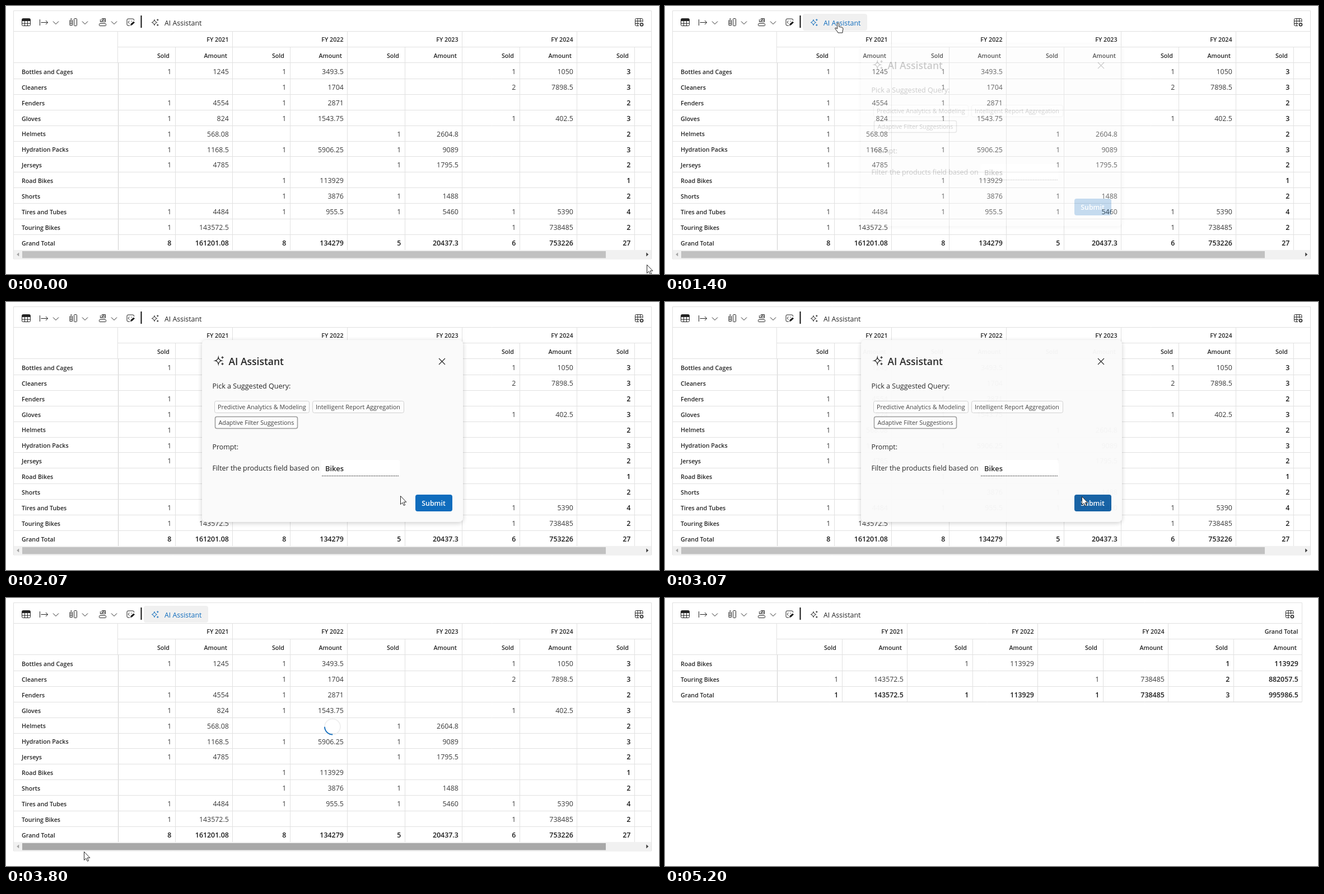
Animation, 1166 px wide and 480 px high, one loop 6.8 s. Source, as an HTML page with a canvas:

```html
<!DOCTYPE html>
<html lang="en">
<head>
<meta charset="utf-8">
<title>Pivot table assistant</title>
<style>
html, body { margin: 0; width: 100%; height: 100%; overflow: hidden; background: #fff; }
canvas { display: block; }
</style>
</head>
<body>
<canvas id="stage" width="1166" height="480"></canvas>
<script>
const stage = document.getElementById('stage').getContext('2d');
const layer = new OffscreenCanvas(1166, 480).getContext('2d');
let ctx = stage;
const LOOP = 6800, FPS = 15;
const INK = '#242424', BLUE = '#0f6cbd', LINE = '#e1e1e1';

const FULL = {
  right: 1152.5, bottom: 453, colWidth: 102.5,
  groups: ['FY 2021', 'FY 2022', 'FY 2023', 'FY 2024', ''],
  rows: [
    'Bottles and Cages|1|1245|1|3493.5|||1|1050|3',
    'Cleaners|||1|1704|||2|7898.5|3',
    'Fenders|1|4554|1|2871|||||2',
    'Gloves|1|824|1|1543.75|||1|402.5|3',
    'Helmets|1|568.08|||1|2604.8|||2',
    'Hydration Packs|1|1168.5|1|5906.25|1|9089|||3',
    'Jerseys|1|4785|||1|1795.5|||2',
    'Road Bikes|||1|113929|||||1',
    'Shorts|||1|3876|1|1488|||2',
    'Tires and Tubes|1|4484|1|955.5|1|5460|1|5390|4',
    'Touring Bikes|1|143572.5|||||1|738485|2',
    'Grand Total|8|161201.08|8|134279|5|20437.3|6|753226|27'
  ]
};
const FILTERED = {
  right: 1137.5, bottom: 186, colWidth: 116.5,
  groups: ['FY 2021', 'FY 2022', 'FY 2024', 'Grand Total'],
  rows: [
    'Road Bikes|||1|113929|||1|113929',
    'Touring Bikes|1|143572.5|||1|738485|2|882057.5',
    'Grand Total|1|143572.5|1|113929|1|738485|3|995986.5'
  ]
};

// Pointer stops: step, x, y
const POINTER = [
  [0, 1144, 463], [1, 820, 288], [2, 504, 119], [4, 504, 119], [8, 390, 62], [13, 309, 30],
  [28, 309, 30], [31, 704, 347], [34, 704, 347], [39, 744, 348], [46, 744, 348],
  [56, 187, 430], [57, 139, 454], [59, 43, 502]
];

const clamp = v => Math.max(0, Math.min(1, v));

function text(s, x, y, size, { weight = 400, color = INK, align = 'left' } = {}) {
  ctx.font = `${weight} ${size}px "Open Sans", "Noto Sans", sans-serif`;
  ctx.fillStyle = color;
  ctx.textAlign = align;
  ctx.fillText(s, x, y);
}
function box(x, y, w, h, r, fill, stroke, width = 1) {
  ctx.beginPath();
  ctx.roundRect(x, y, w, h, r);
  if (fill) { ctx.fillStyle = fill; ctx.fill(); }
  if (stroke) { ctx.strokeStyle = stroke; ctx.lineWidth = width; ctx.stroke(); }
}
function path(d, color = INK, width = 1, fill) {
  const p = new Path2D(d);
  if (fill) { ctx.fillStyle = fill; ctx.fill(p); }
  ctx.strokeStyle = color;
  ctx.lineWidth = width;
  ctx.stroke(p);
}
function at(x, y, draw, scale = 1) {
  ctx.save();
  ctx.translate(x, y);
  ctx.scale(scale, scale);
  draw();
  ctx.restore();
}
const hline = (x1, x2, y, color = LINE) => path(`M${x1} ${y}H${x2}`, color);
const vline = (x, y1, y2, color = LINE) => path(`M${x} ${y1}V${y2}`, color);

function sparkles(color) {
  path('M5 1.5Q5.8 5.8 9.6 6.5Q5.8 7.2 5 11.5Q4.2 7.2 .4 6.5Q4.2 5.8 5 1.5Z', color);
  path('M10.8 .2v3.4M9.1 1.9h3.4M10.8 9.4v3.4M9.1 11.1h3.4', color);
}

function toolbar(right, active, pressed) {
  path('M28.5 24.5q0-2 2-2h11q2 0 2 2v9q0 2-2 2h-11q-2 0-2-2zM28.5 31.2h15M33.5 26v9.5M38.5 26v9.5');
  box(28.5, 22.5, 15, 4.5, [2, 2, 0, 0], INK);
  path('M60.5 24v11M62.5 29.5h12M71 26l3.7 3.5-3.7 3.5');
  path('M121.5 23.5q0-1 1-1h3q1 0 1 1v11q0 1-1 1h-3q-1 0-1-1zM118.5 25.5h-4.5v9h4.5zM114 28.5h4.5M114 31.5h4.5M115 23h3');
  path('M167.5 31.5h10q1 0 1 1v2q0 1-1 1h-10q-1 0-1-1v-2q0-1 1-1zM171.5 22.5h6v6h-6zM171.5 25.5h6M168.5 24v4.5h3M174.5 22.5v3');
  path('M228.5 26v-1q0-2-2-2h-8.5q-2 0-2 2v8q0 2 2 2h3M220.5 26.5l-2.5 2.5 2.5 2.5M223.5 26.5l1.5 1.5');
  path('M222.5 34.5l1-3 4.5-3.5 1.5 1.5-4 4z', INK, 1, INK);
  for (const x of [84, 136, 188]) path(`M${x} 27.5l5 5 5-5`);
  path('M241.5 17v22', '#111', 2);

  if (active) box(246, 14, 115, 30, 4, pressed ? '#ebebeb' : '#f0f0f0');
  const color = active ? BLUE : INK;
  at(260, 23, () => sparkles(color));
  text('AI Assistant', 283, 34.5, 12.4, { color });

  at(right - 29.5, 22, () => {
    path('M14 6.5V2.5q0-2-2-2H2.5q-2 0-2 2v9q0 2 2 2H7M.5 5H14M.5 9.5H8M5 .5v13M9.5 .5V7');
    box(9.5, 8.7, 5, 5, 2.5, null, INK, 1.6);
  });
}

function table({ right, bottom, colWidth, groups, rows }) {
  const left = 13.5, first = 199.5, top = 102, pitch = 27.9;
  const columns = groups.length * 2;
  // The last column takes up whatever width is left over.
  const edge = i => i < columns ? first + i * colWidth : Math.max(right, first + i * colWidth);

  ctx.save();
  ctx.beginPath();
  ctx.rect(0, 0, right, 480);
  ctx.clip();
  hline(left, right, 45.5);
  hline(first, right, 73.5);
  hline(left, right, 101.5);
  vline(first, 45, top);
  vline(200.5, top, bottom, '#cfcfcf');

  const bold = { weight: 600, align: 'right' };
  groups.forEach((name, g) => {
    const mid = edge(g * 2 + 1), end = edge(g * 2 + 2);
    text(name, end - 7, 64, 10.7, bold);
    text('Sold', mid - 10, 92.5, 10.7, bold);
    text('Amount', end - 9.5, 92.5, 10.7, bold);
    vline(Math.floor(mid) + .5, 73, bottom);
    vline(Math.floor(end) + .5, 45, bottom);
  });

  rows.forEach((row, r) => {
    const [label, ...cells] = row.split('|');
    const base = 122 + r * pitch;
    hline(left, right, Math.round(top + (r + 1) * pitch) + .5);
    text(label, 28, base - .2, 10.7, { weight: 600 });
    cells.forEach((value, c) => {
      const total = r === rows.length - 1 || c >= columns - 2;
      text(value, edge(c + 1) - 6.7, base, 12.4,
        { weight: total ? 600 : 400, color: total ? '#1a1a1a' : '#3a3a3a', align: 'right' });
    });
  });
  ctx.restore();
  box(left, 8.5, right - left, bottom - 8.5, 0, null, LINE);
}

function scrollbar(hot) {
  box(14, 437, 1138, 16, 0, '#f1f1f1');
  box(29, 439, 1042, 12.5, 0, hot ? '#a8a8a8' : '#c1c1c1');
  path('M23 442v6l-3.5-3z', '#a3a3a3', .5, '#a3a3a3');
  path('M1143.5 442v6l3.5-3z', '#404040', .5, '#404040');
}

// Cubic easing with control points (.53,.21) and (.29,.67)
function swing(p) {
  const curve = (s, a, b) => 3 * (1 - s) ** 2 * s * a + 3 * (1 - s) * s * s * b + s ** 3;
  let lo = 0, hi = 1;
  for (let i = 0; i < 20; i++) {
    const m = (lo + hi) / 2;
    if (curve(m, .53, .29) < p) lo = m; else hi = m;
  }
  return curve(lo, .21, .67);
}

function spinner(ms) {
  const turn = swing(ms / 1300 % 1) * 2 * Math.PI;
  const ring = (from, to, color, width) => {
    ctx.beginPath();
    ctx.arc(583, 230.5, 14, from, to);
    ctx.strokeStyle = color;
    ctx.lineWidth = width;
    ctx.stroke();
  };
  ring(0, 2 * Math.PI, '#ededed', 1.5);
  ring(turn - Math.PI * .75, turn - Math.PI * .25, BLUE, 1.8);
}

function dialog(hot) {
  ctx.save();
  ctx.shadowColor = 'rgba(0,0,0,.2)';
  ctx.shadowBlur = 9;
  ctx.shadowOffsetY = 2;
  box(350, 68, 466, 326, 7, '#fafafa');
  ctx.restore();

  at(373, 97, () => sparkles(INK), 1.25);
  text('AI Assistant', 397.5, 113, 17.5, { weight: 600 });
  path('M773 101l11 11M784 101l-11 11', INK, 1.1);

  text('Pick a Suggested Query:', 368.5, 154.5, 12.55);
  const chip = { color: '#424242' };
  box(372.5, 177.5, 169, 21, 3, '#fcfcfc', '#d1d1d1');
  text('Predictive Analytics & Modeling', 378, 192.3, 10.85, chip);
  box(547.5, 177.5, 163, 21, 3, '#fcfcfc', '#d1d1d1');
  text('Intelligent Report Aggregation', 553, 192.3, 10.85, chip);
  box(373.5, 205.5, 147, 21, 3, '#fcfcfc', '#9a9a9a', 1.5);
  text('Adaptive Filter Suggestions', 379.5, 220.3, 10.75, chip);

  text('Prompt:', 368.5, 264, 12.4);
  text('Filter the products field based on', 368.5, 301.5, 12.45);
  box(563, 283, 140, 29, [3, 3, 0, 0], '#fff');
  ctx.setLineDash([2, 1]);
  hline(564, 702, 311.5, '#424242');
  ctx.setLineDash([]);
  text('Bikes', 570, 303, 12.9, { weight: 600 });

  box(731, 345, 66, 30, 4, hot ? '#115ea3' : BLUE);
  text('Submit', 763.5, 365, 12.4, { weight: 600, color: '#fff', align: 'center' });
}

// Draws on a separate layer, so that the whole group fades as one.
function faded(alpha, paint) {
  if (alpha <= 0) return;
  layer.clearRect(0, 0, 1166, 480);
  ctx = layer;
  paint();
  ctx = stage;
  ctx.globalAlpha = alpha;
  ctx.drawImage(layer.canvas, 0, 0);
  ctx.globalAlpha = 1;
}

function pointerAt(n) {
  const i = POINTER.findIndex(k => k[0] >= n);
  if (i < 0) return null;
  const [n2, x2, y2] = POINTER[i];
  const [n1, x1, y1] = POINTER[Math.max(0, i - 1)];
  const p = n2 > n1 ? (n - n1) / (n2 - n1) : 0;
  return { x: x1 + (x2 - x1) * p, y: y1 + (y2 - y1) * p };
}

function pointer({ x, y }, hand) {
  at(x, y, () => path(hand
    ? 'M-1.5 1q1.5-2 3 0v6l5 1q2.5.7 2.5 3l-1 5v2h-8l-1-2-4-5q-1-2 1-2l2.5 2z'
    : 'M.5 .5v15l3.4-3.2 2.5 5.2 2.2-1-2.4-5.2h4.6z', INK, 1, '#fff'));
}

function draw(ms) {
  const n = Math.floor((ms % LOOP + 4) * FPS / 1000);
  const filtered = n >= 78;
  const data = filtered ? FILTERED : FULL;
  const tip = pointerAt(n);
  const over = !!tip && tip.x > 246 && tip.x < 361 && tip.y > 14 && tip.y < 44;
  const active = over || (n >= 52 && !filtered);

  ctx.fillStyle = '#fff';
  ctx.fillRect(0, 0, 1166, 480);
  table(data);
  toolbar(data.right, active, n === 18 || n === 19);
  if (!filtered) scrollbar(n === 57);
  if (n >= 47 && !filtered) spinner(n * 1000 / FPS - 3111);

  const alpha = n < 46 ? clamp((n - 19.6) / 6) : clamp(.97 - (n - 46) / 6);
  const hot = n >= 46 || (n > 34 && tip.x > 731);
  faded(alpha, () => dialog(hot));
  if (tip) pointer(tip, over);
}

function tick() {
  draw(performance.now());
  requestAnimationFrame(tick);
}
tick();
</script>
</body>
</html>
```
